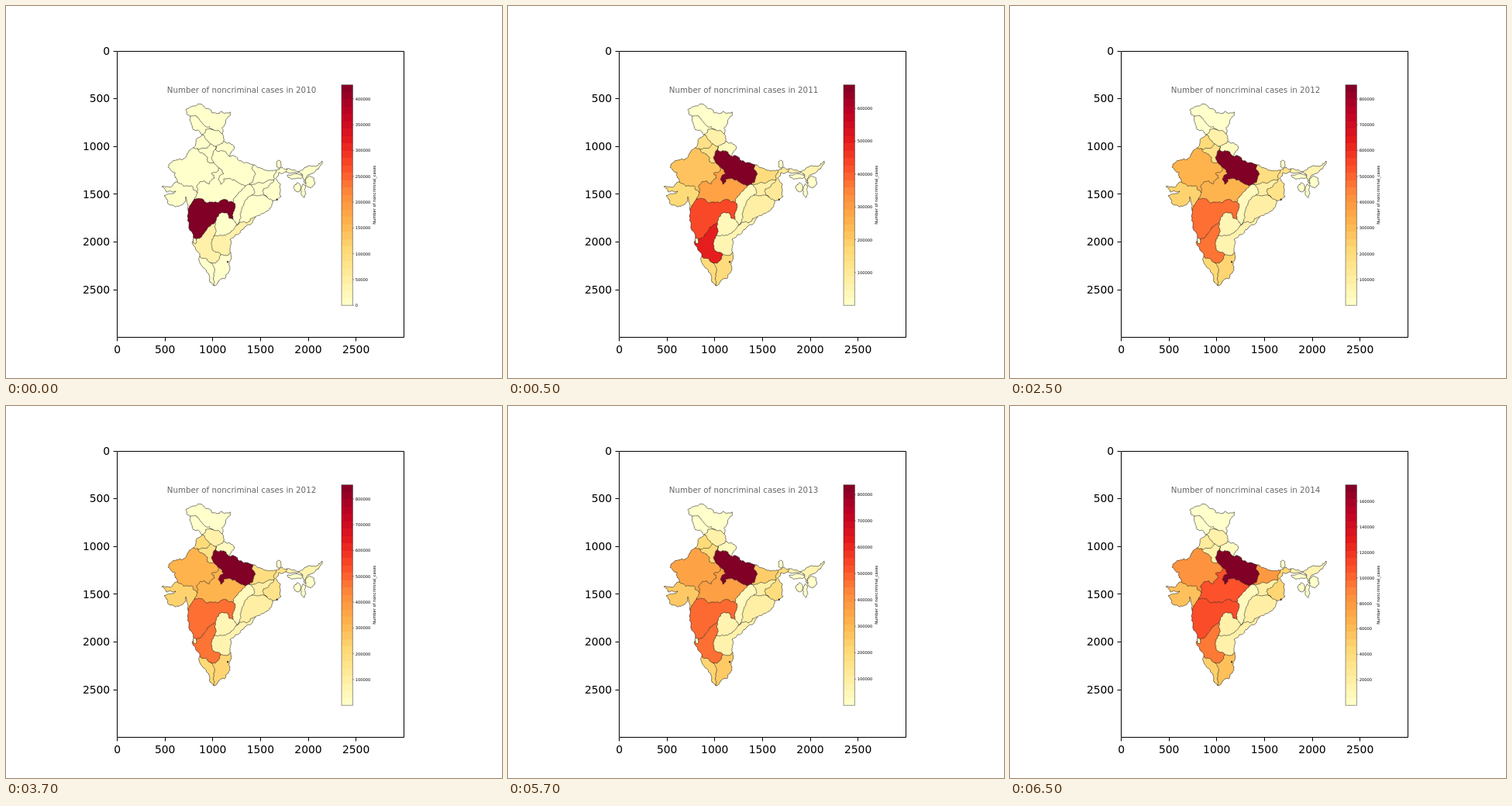
Recreate the animation shown at these times as an HTML page with a canvas. Size 640x480 px, loop 8 s.

```html
<!DOCTYPE html>
<html lang="en">
<head>
<meta charset="utf-8">
<title>Noncriminal cases by year</title>
<style>
html, body { margin: 0; width: 100%; height: 100%; overflow: hidden; background: #fff; }
canvas { display: block; }
</style>
</head>
<body>
<canvas id="stage" width="640" height="480"></canvas>
<script>
const ctx = document.getElementById('stage').getContext('2d');
const FONT = '"DejaVu Sans", Verdana, sans-serif';
const LOOP = 8000, FIRST = 500, HOLD = 2000;
const FIRST_YEAR = 2010;
const PEAKS = [427500, 672500, 855000, 837500, 173000]; // top of the scale, per year

// colour levels: the first year, then evenly spaced keys for the later years
const OPENING = { MH: 1, KA: .1, AP: .1 };
const LEVELS = {
  UP: [1], HP: [.1], UK: [.03], OD: [.11], JH: [.11], CG: [.04], AS: [.08],
  AP: [.07, .1], TG: [.05, .1], PB: [.2, .24, .24, .14], HR: [.2, .2, .24, .1],
  RJ: [.32, .48], GJ: [.24, .33], TN: [.23, .33], KL: [.23, .28], WB: [.15, .26],
  BR: [.23, .22, .29, .46], MP: [.43, .37, .44, .62],
  MH: [.64, .56, .57, .63], KA: [.74, .55, .56, .54], LA: [0], JK: [0]
};

// points where borders meet
const JOINTS = Object.fromEntries(`a238,142 b268,160 c279,165 d253,166 e281,175 f271,181 g264,178
  h242,183 i247,184 j268,202 k288,194 l319,205 m275,209 n247,241 o221,227 p235,264 q243,249
  r293,253 s309,232 t314,230 v317,244 w298,283 x293,275 y270,279 A242,301 B250,323 C264,331
  D277,321 E268,297 F322,272 G290,318 H268,361 I337,247 J344,251 K346,224 L349,212 M363,210
  N361,214`.split(/\s+/).map(s => [s[0], s.slice(1)]));

// owner or owners, then the border from joint to joint with its key bends
const BORDERS = `
LA: a 232,134 248,126 266,138 290,137 284,151 c
LA JK: a 247,143 b
JK: a 239,152 d
JK HP: d 258,159 b
LA HP: b c
HP: c e
HP UK: e f
HP HR: f g
HP PB: g d
PB: d 248,170 h
PB RJ: h i
PB HR: i 260,183 g
HR RJ: i 256,191 260,201 j
HR UP: f 267,192 j
UK UP: f 272,187 k
UK: e 295,182 k
UP: k 304,200 l
UP RJ: j m
RJ: h 228,198 213,202 209,208 o
RJ MP: m 265,216 269,222 262,230 257,226 250,227 n
RJ GJ: n 239,232 o
GJ: o 201,233 207,240 219,239 204,245 218,259 228,256 232,246 p
GJ MH: p q
GJ MP: q n
MP MH: q 260,254 r
MP CG: r 300,241 s
MP UP: m 281,216 274,224 277,230 281,223 296,225 s
UP CG: s t
UP BR: t 322,217 l
JH CG: t 321,240 v
CG OD: v 304,262 w
CG MH: r x
CG TG: x w
MH TG: x 288,274 286,267 275,268 y
MH KA: y 258,290 A
MH: p 237,289 A
KA: A B
KA KL: B C
KA TN: C 271,331 D
KA AP: D 266,314 E
KA TG: E y
AP TG: E 288,293 w
AP OD: w F
AP: F 303,290 289,301 G
AP TN: G D
TN: G 287,344 274,355 H
KL: B 261,345 H
KL TN: C 268,345 H
OD JH: v I
OD WB: I J
OD: J 340,261 F
JH BR: t 333,228 K
JH WB: K 332,236 I
BR WB: K L
BR: l 332,211 L
WB: L 355,208 M
WB AS: M N
WB: N 352,215 348,222 354,230 355,246 J
AS: M 388,208 408,200 388,220 386,229 383,218 N`;

// small areas at the palest level: centre and radii
const SMALL = { SK: [352, 204, 3.5, 5], ML: [373, 219.5, 11, 3], MN: [392.5, 227, 6.5, 8],
  TR: [376, 234, 4.5, 6], MZ: [384, 238.5, 3.5, 9], GA: [243.5, 303, 2.5, 4] };

const RAMP = ['ffffcc', 'ffeda0', 'fed976', 'feb24c', 'fd8d3c', 'fc4e2a', 'e31a1c', 'bd0026', '800026']
  .map(hex => [0, 2, 4].map(i => parseInt(hex.slice(i, i + 2), 16)));

// linear sampling of evenly spaced keys, t from 0 to 1
function sample(keys, t) {
  const x = t * (keys.length - 1);
  const i = Math.floor(x), next = keys[Math.min(i + 1, keys.length - 1)];
  return keys[i] + (next - keys[i]) * (x - i);
}

const shade = t => `rgb(${[0, 1, 2].map(c => Math.round(sample(RAMP.map(rgb => rgb[c]), t)))})`;

function level(code, index) {
  if (index === 0) return OPENING[code] || 0;
  return sample(LEVELS[code], (index - 1) / (PEAKS.length - 2));
}

let seed = 11;
function random() {
  seed = (seed * 16807) % 2147483647;
  return seed / 2147483647;
}

// midpoint displacement between two points; returns everything after a
function roughen(a, b) {
  const dx = b[0] - a[0], dy = b[1] - a[1];
  if (Math.hypot(dx, dy) < 2) return [b];
  const k = (random() - .5) * .42;
  const mid = [(a[0] + b[0]) / 2 - dy * k, (a[1] + b[1]) / 2 + dx * k];
  return [...roughen(a, mid), ...roughen(mid, b)];
}

function roughLine(pts) {
  const line = [pts[0]];
  for (let i = 1; i < pts.length; i++) line.push(...roughen(pts[i - 1], pts[i]));
  return line;
}

function trace(pts) {
  const path = new Path2D();
  pts.forEach(p => path.lineTo(...p));
  return path;
}

const arcs = BORDERS.trim().split('\n').map(row => {
  const [owners, route] = row.split(': ');
  const pts = route.split(' ').map(p => (JOINTS[p] || p).split(',').map(Number));
  return { owners: owners.split(' '), line: roughLine(pts) };
});

const same = (a, b) => a[0] === b[0] && a[1] === b[1];

// joins all borders of a state end to end
function outline(code) {
  const rest = arcs.filter(a => a.owners.includes(code)).map(a => a.line);
  const ring = [...rest.shift()];
  while (rest.length) {
    const tail = ring[ring.length - 1];
    const i = rest.findIndex(l => same(l[0], tail) || same(l[l.length - 1], tail));
    if (i < 0) break;
    const [next] = rest.splice(i, 1);
    ring.push(...(same(next[0], tail) ? next : [...next].reverse()).slice(1));
  }
  return trace(ring);
}

function blob([x, y, rx, ry]) {
  const corners = [];
  for (let i = 0; i <= 6; i++) {
    const a = i * Math.PI / 3 + .4;
    corners.push([x + rx * Math.cos(a), y + ry * Math.sin(a)]);
  }
  return trace(roughLine(corners));
}

const states = Object.keys(LEVELS).map(code => ({ code, path: outline(code) }));
const lines = arcs.map(a => trace(a.line));
const blobs = Object.values(SMALL).map(blob);

function label(text, x, y, size, align, color = '#000') {
  ctx.font = `${size}px ${FONT}`;
  ctx.textAlign = align;
  ctx.fillStyle = color;
  ctx.fillText(text, x, y);
}

function segment(x1, y1, x2, y2) {
  ctx.beginPath();
  ctx.moveTo(x1, y1);
  ctx.lineTo(x2, y2);
  ctx.stroke();
}

function drawAxes() {
  const snap = v => Math.floor(v + .5) + .5;
  ctx.strokeStyle = '#000';
  ctx.lineWidth = 1;
  ctx.strokeRect(143.5, 58.5, 370, 369);
  for (let v = 0; v <= 2500; v += 500) {
    const x = 143.26 + v * .1232, y = 57.66 + v * .1232;
    segment(snap(x), 428, snap(x), 432.5);
    segment(138.5, snap(y), 143, snap(y));
    label(v, x + .3, 448, 13.89, 'center');
    label(v, 134.2, Math.round(y + 5.2), 13.89, 'right');
  }
}

function drawMap(index) {
  for (const { code, path } of states) {
    ctx.fillStyle = shade(level(code, index));
    ctx.fill(path);
  }
  ctx.strokeStyle = '#000';
  ctx.lineWidth = .5;
  ctx.lineJoin = 'round';
  lines.forEach(l => ctx.stroke(l));
  ctx.fillStyle = shade(0);
  for (const b of blobs) {
    ctx.fill(b);
    ctx.stroke(b);
  }
  ctx.fillStyle = '#111';
  ctx.fillRect(285.3, 329, 1.5, 2.4);
  ctx.fillRect(349, 248.5, 1.3, 2.5);
}

// smallest 1-2-5 step that needs at most nine intervals
function niceStep(peak) {
  const unit = 10 ** Math.floor(Math.log10(peak / 9));
  return [1, 2, 5, 10].map(k => k * unit).find(s => peak / s <= 9);
}

function drawBar(index) {
  const x = 433, w = 14.4, top = 101.5, h = 284.8, bands = 30;
  for (let i = 0; i < bands; i++) {
    const edge = k => Math.round(top + h * (1 - k / bands));
    ctx.fillStyle = shade((i + .5) / bands);
    ctx.fillRect(x, edge(i + 1), w, edge(i) - edge(i + 1));
  }
  ctx.strokeStyle = '#000';
  ctx.lineWidth = .41;
  ctx.strokeRect(x, top, w, h);
  const peak = PEAKS[index], step = niceStep(peak);
  for (let v = index ? step : 0; v <= peak; v += step) {
    const y = top + h * (1 - v / peak);
    segment(x + w, y, x + w + 1.8, y);
    label(v, 450.8, y + 1.9, 5.13, 'left');
  }
  ctx.save();
  ctx.translate(477, 243.8);
  ctx.rotate(-Math.PI / 2);
  label('Number of noncriminal_cases', 0, 0, 5.13, 'center');
  ctx.restore();
}

function draw(time) {
  const index = Math.floor((time % LOOP - FIRST) / HOLD) + 1;
  ctx.fillStyle = '#fff';
  ctx.fillRect(0, 0, 640, 480);
  drawAxes();
  label(`Number of noncriminal cases in ${FIRST_YEAR + index}`, 304, 111.5, 10.27, 'center', '#666');
  drawMap(index);
  drawBar(index);
}

const start = performance.now();
function tick() {
  draw(performance.now() - start);
  requestAnimationFrame(tick);
}
tick();
</script>
</body>
</html>
```
